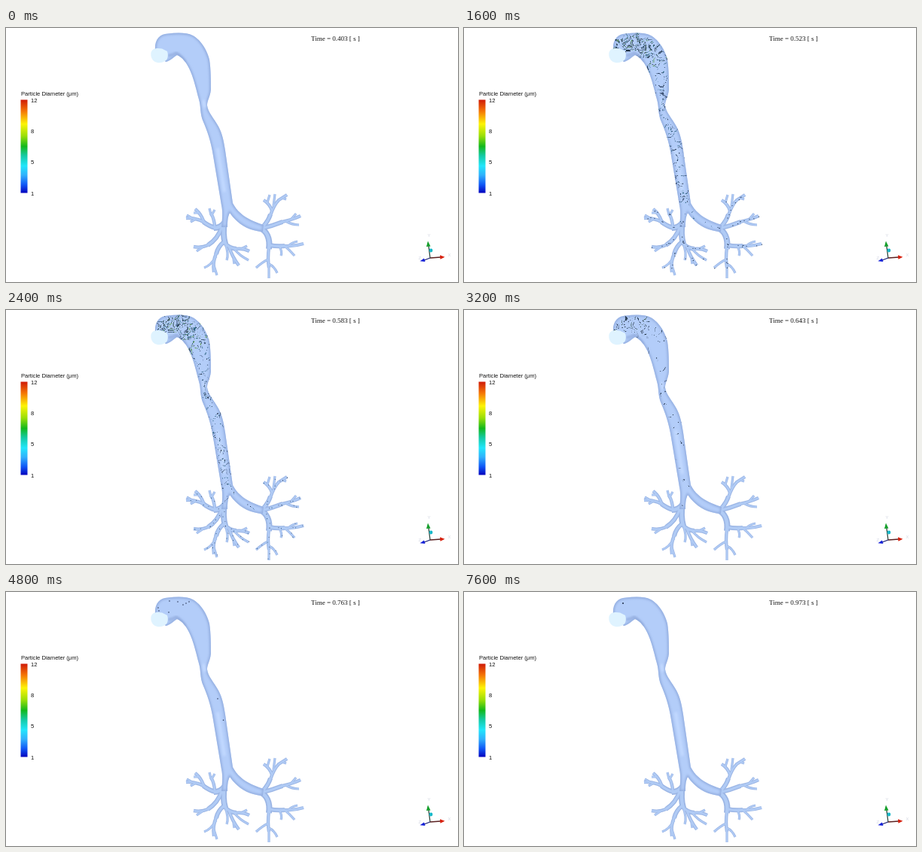
An HTML page without scripts that plays this animation: 600 px wide and 338 px high, repeating every 7700 ms.

```html
<!DOCTYPE html>
<html lang="en">
<head>
<meta charset="utf-8">
<title>Airway particle flow</title>
<style>
/* --n counts the 100 ms steps; every moving part is a function of it */
@property --n { syntax: "<integer>"; inherits: true; initial-value: 0; }
@property --t { syntax: "<integer>"; inherits: true; initial-value: 403; }
@keyframes run { from { --n: 0; } to { --n: 77; } }

html { animation: run 7.7s steps(77) infinite; }
html, body { margin: 0; width: 100%; height: 100%; overflow: hidden; background: #fff; }
svg { display: block; width: 100vw; height: 100vh; }

.time {
  --t: calc(403 + var(--n) * 7.5);
  counter-reset: t var(--t);
  position: absolute; left: 405px; top: 9px;
  font: 9px/10px "Liberation Serif", Times, serif;
  white-space: pre; color: #111;
}
.time::after { content: "Time = 0." counter(t) " [ s ]"; }

.legend { font: 7.6px "Liberation Sans", Arial, sans-serif; fill: #111; }
.axes text { font: 6px "Liberation Sans", Arial, sans-serif; fill: #d4d8e2; }

.tree path {
  fill: none; stroke-linecap: inherit; stroke-linejoin: round;
  stroke-width: calc((var(--w) * var(--k) + var(--c)) * 1px);
}
.w1 { --w: 8; } .w2 { --w: 6; } .w3 { --w: 4.4; } .w4 { --w: 3.2; }
.edge { --k: 1; --c: 0; stroke: #9cb6e5; }
.core { --k: .55; --c: 0; stroke: #b0cbf5; }

.dots {
  --k: 0; --c: 1.25; --o: 0;
  fill: none; stroke-linecap: round; stroke-width: 1.5px;
  opacity: clamp(0, min((var(--n) - var(--a)) / 2, (var(--z) - var(--n)) / 3), 1);
}
.flow path, .tree path { stroke-dashoffset: calc((var(--o) - var(--n) * var(--v, 0)) * 1px); }
.front { stroke-dasharray: max(0px, calc((var(--n) - 1) * 30px)) 900px; }

.drift { transform: translate(calc((var(--n) - 48) * -.5px), 0); }
.fall { transform: translate(calc((var(--n) - 48) * .5px), calc((var(--n) - 48) * 3px)); }
.last {
  opacity: clamp(0, var(--n) - 54, 1);
  transform: translate(calc((var(--n) - 64) * -1.58px), calc((var(--n) - 64) * .25px));
}
</style>
</head>
<body>
<svg viewBox="0 0 600 338">
<defs>
  <linearGradient id="scale" x1="0" y1="0" x2="0" y2="1">
    <stop offset="0" stop-color="#cf1a08"/>
    <stop offset=".12" stop-color="#f47406"/>
    <stop offset=".26" stop-color="#fdf406"/>
    <stop offset=".39" stop-color="#98de08"/>
    <stop offset=".5" stop-color="#12b81c"/>
    <stop offset=".6" stop-color="#14caa4"/>
    <stop offset=".71" stop-color="#22e6fb"/>
    <stop offset=".81" stop-color="#30b0fc"/>
    <stop offset=".91" stop-color="#1058f6"/>
    <stop offset="1" stop-color="#0404be"/>
  </linearGradient>

  <path id="body" d="M198 30C197 16 203 8 215 7.5C228 6 240 6 248 10C259 16 267 30 270 42
    C272 55 272 70 272 82C271 92 267 96 267 103C268 112 276 120 282 131C287 140 289 150 291 163
    L301 233C308 247 322 256 342 262L341 271C320 270 306 259 297 246C294 252 294 258 294 265
    L286 265C287 254 288 245 286 236L275 170C272 150 267 137 262 125C257 114 259 104 256 95
    C253 84 250 70 245 58C240 46 234 39 227 36C222 39 218 44 212 45Z"/>
  <clipPath id="inside"><use href="#body"/></clipPath>
  <clipPath id="mouth"><path d="M190 0H274V38L246 56H190Z"/></clipPath>
  <clipPath id="cap"><path d="M190 0H242V36H190Z"/></clipPath>

  <filter id="soft"><feGaussianBlur stdDeviation="1.6"/></filter>
  <filter id="stir" filterUnits="userSpaceOnUse" x="180" y="0" width="180" height="280" color-interpolation-filters="sRGB">
    <feTurbulence type="fractalNoise" baseFrequency=".11" seed="4"/>
    <feDisplacementMap in="SourceGraphic" scale="18" xChannelSelector="R" yChannelSelector="G"/>
  </filter>
  <mask id="reach" maskUnits="userSpaceOnUse" x="0" y="0" width="600" height="338">
    <path class="front" fill="none" stroke="#fff" stroke-width="90"
      d="M204 40C204 16 216 17 228 17S252 30 260 54 266 84 264 100C263 116 278 130 282 160L296 270"/>
  </mask>

  <g id="tree" class="tree">
    <g class="w1">
      <path d="M290 258C288 270 289 280 291 287"/>
      <path d="M336 266C346 269 351 280 349 294"/>
      <path d="M290 259Q285 266 276 266"/>
    </g>
    <g class="w2">
      <path d="M278 266Q270 264 262 258"/>
      <path d="M338 267Q347 260 351 248"/>
      <path d="M338 267Q352 264 367 258"/>
      <path d="M287 264Q281 281 268 289"/>
      <path d="M290 284Q281 291 279 301"/>
      <path d="M290 285Q295 293 306 294"/>
      <path d="M350 289Q359 291 370 290"/>
    </g>
    <g class="w3">
      <path d="M349 292Q347 306 349 319"/>
      <path d="M262 258Q251 252 239 253"/>
      <path d="M263 259Q259 247 251 241"/>
      <path d="M277 266Q277 254 272 247"/>
      <path d="M268 289Q259 293 249 291"/>
      <path d="M279 300Q274 311 276 325"/>
      <path d="M306 294Q315 293 323 297"/>
      <path d="M296 291Q300 304 309 316"/>
      <path d="M351 249Q356 235 362 229L373 222"/>
      <path d="M353 243Q350 234 342 229"/>
      <path d="M366 258Q378 256 391 250"/>
      <path d="M369 290Q382 291 395 287"/>
    </g>
    <g class="w4">
      <path d="M247 253L240 249M252 254L245 258"/>
      <path d="M256 246L249 246M272 248L270 240M273 249L277 242"/>
      <path d="M262 291L253 297"/>
      <path d="M279 304Q272 316 263 319M276 316L280 329"/>
      <path d="M303 294Q310 303 322 309M312 294L320 290"/>
      <path d="M291 287Q296 300 293 309M302 307L303 314"/>
      <path d="M355 237L357 221M347 232L350 222M366 226L372 228"/>
      <path d="M371 257Q380 262 389 262M378 255L385 247"/>
      <path d="M370 290Q377 296 383 303M374 291Q379 285 387 284"/>
      <path d="M363 290Q367 298 365 303"/>
      <path d="M348 308Q341 311 332 319M349 314L349 333M349 314Q356 317 360 326"/>
    </g>
  </g>

  <g id="flow" class="flow">
    <path style="--o:0" d="M200 28C199 10 214 9 228 9S264 18 269 48 269 80 265 100C268 112 284 128 289 158L300 234"/>
    <path style="--o:17" d="M202 28C203 13 215 13 228 13S258 24 264 50 267 82 264 100C266 113 282 130 286 158L297 235"/>
    <path style="--o:41" d="M205 28C207 17 216 17 228 17S252 30 260 54 266 84 264 100C265 114 279 131 283 159L295 235"/>
    <path style="--o:66" d="M208 29C211 21 218 21 228 21S246 35 256 58 263 85 263 100C263 115 276 133 280 159L292 236"/>
    <path style="--o:95" d="M212 31C215 26 220 25 228 26S242 38 252 62 261 86 263 100C261 117 273 135 278 160L290 236"/>
    <path style="--o:118" d="M215 33C218 30 222 28 228 31S238 42 248 62 258 86 262 100C259 118 271 136 275 160L287 236"/>
    <path style="--o:7" d="M296 232Q309 258 341 267"/>
    <path style="--o:29" d="M291 232V266"/>
  </g>
</defs>

<g class="legend">
  <text x="20" y="90">Particle Diameter (μm)</text>
  <rect x="19.5" y="95.5" width="9" height="124" fill="url(#scale)"/>
  <text x="33" y="98.6">12</text>
  <text x="33" y="140">8</text>
  <text x="33" y="181.4">5</text>
  <text x="33" y="222.6">1</text>
</g>

<use href="#tree" class="edge"/>
<use href="#tree" class="core"/>
<use href="#body" fill="#b3cdf9"/>
<g clip-path="url(#inside)">
  <use href="#body" fill="none" stroke="#93addf" stroke-width="3.6" filter="url(#soft)"/>
  <path d="M215 37Q221 36 226 33Q232 36 238 46" fill="none" stroke="#8ea8da" stroke-width="2.5" filter="url(#soft)"/>
  <path d="M262 96L264 106M281 160L290 218" fill="none" stroke="#c2d9ff" stroke-width="4" filter="url(#soft)"/>
</g>

<g mask="url(#reach)"><g clip-path="url(#inside)"><g filter="url(#stir)">
  <use href="#flow" class="dots" style="--a:0;--z:26;--v:7" stroke="#24395a" stroke-dasharray="0 9 0 23 0 14 0 31 0 6 0 17"/>
  <use href="#flow" class="dots" style="--a:0;--z:31;--v:6.2" stroke="#2f6482" stroke-dasharray="0 17 0 7 0 26 0 12 0 33" transform="translate(-1.6 1.2)"/>
  <use href="#flow" class="dots" style="--a:1;--z:41;--v:5" stroke="#1c2c40" stroke-dasharray="0 47 0 31 0 72" transform="translate(1 1)"/>
  <g clip-path="url(#mouth)">
    <use href="#flow" class="dots" style="--a:1;--z:28;--v:2.3" stroke="#20364c" stroke-dasharray="0 5 0 11 0 7 0 14 0 4"/>
    <use href="#flow" class="dots" style="--a:2;--z:29;--v:1.7" stroke="#2d7280" stroke-dasharray="0 9 0 5 0 14 0 7" transform="translate(.5 1.4)"/>
    <use href="#flow" class="dots" style="--a:2;--z:29;--v:2.9" stroke="#5f9a50" stroke-dasharray="0 11 0 6 0 17 0 9" transform="translate(-.5 2.6)"/>
    <use href="#flow" class="dots" style="--a:2;--z:28;--v:2.6" stroke="#24404c" stroke-dasharray="0 13 0 7 0 10" transform="translate(1 -1.3)"/>
    <use href="#flow" class="dots" style="--a:3;--z:46;--v:1.3" stroke="#22384e" stroke-dasharray="0 14 0 23 0 18" transform="translate(1.5 .8)"/>
  </g>
  <g clip-path="url(#cap)">
    <use href="#flow" class="dots" style="--a:3;--z:37;--v:1.1" stroke="#1c2a3a" stroke-dasharray="0 5 0 11 0 7 0 9" transform="translate(0 2)"/>
    <use href="#flow" class="dots" style="--a:5;--z:40;--v:1.6" stroke="#3c5a50" stroke-dasharray="0 13 0 19" transform="translate(0 -1)"/>
  </g>
</g></g></g>

<use href="#tree" class="dots" style="--a:8;--z:26;--v:3" stroke="#30466a" stroke-dasharray="0 13 0 29 0 19" transform="translate(1 -.6)"/>
<use href="#tree" class="dots" style="--a:9;--z:30;--v:2.4" stroke="#37628a" stroke-dasharray="0 32 0 19 0 41" transform="translate(-1 .5)"/>
<use href="#tree" class="dots" style="--a:9;--z:37;--v:1.2" stroke="#1c2c40" stroke-dasharray="0 7 0 59 0 83" transform="translate(.5 1)"/>

<g class="dots" style="--a:36;--z:56" stroke="#1c2a44">
  <path class="drift" d="M202 21h0M203 25h0M217 12h0M216 27h0M228 13h0M235 17h0M239 15h0M243 13h0"/>
</g>
<g class="dots" style="--a:42;--z:55" stroke="#1c2a44">
  <path class="fall" d="M281 142h0M288.5 170.5h0"/>
</g>
<circle class="last" cx="230" cy="12" r="1" fill="#1c2a44"/>

<path d="M192.3 34C193 27 200 26 207 27.5L214 31Q216 37 213.5 42C208 47.5 201 47 197 44.5Q192 41 192.3 34Z" fill="#dff3ff"/>

<g class="axes">
  <g fill="none" stroke-width="1.3">
    <path d="M563 306L561 290" stroke="#28443a"/>
    <path d="M563 306L577 305" stroke="#5a2020"/>
    <path d="M563 306L555 309" stroke="#181c70"/>
  </g>
  <path d="M560 283.5L563.5 290.5L558 291Z" fill="#17a02c"/>
  <path d="M582.5 304.7L576 302.2L576.5 307.8Z" fill="#d8200e"/>
  <path d="M549.5 310.3L555 306.6L556.5 311Z" fill="#1420d8"/>
  <circle cx="564" cy="296" r="2.4" fill="#18b8c8"/>
  <text x="559.5" y="278">Y</text>
  <text x="586.5" y="304">X</text>
  <text x="547.5" y="308">Z</text>
</g>
</svg>
<div class="time"></div>
</body>
</html>
```
